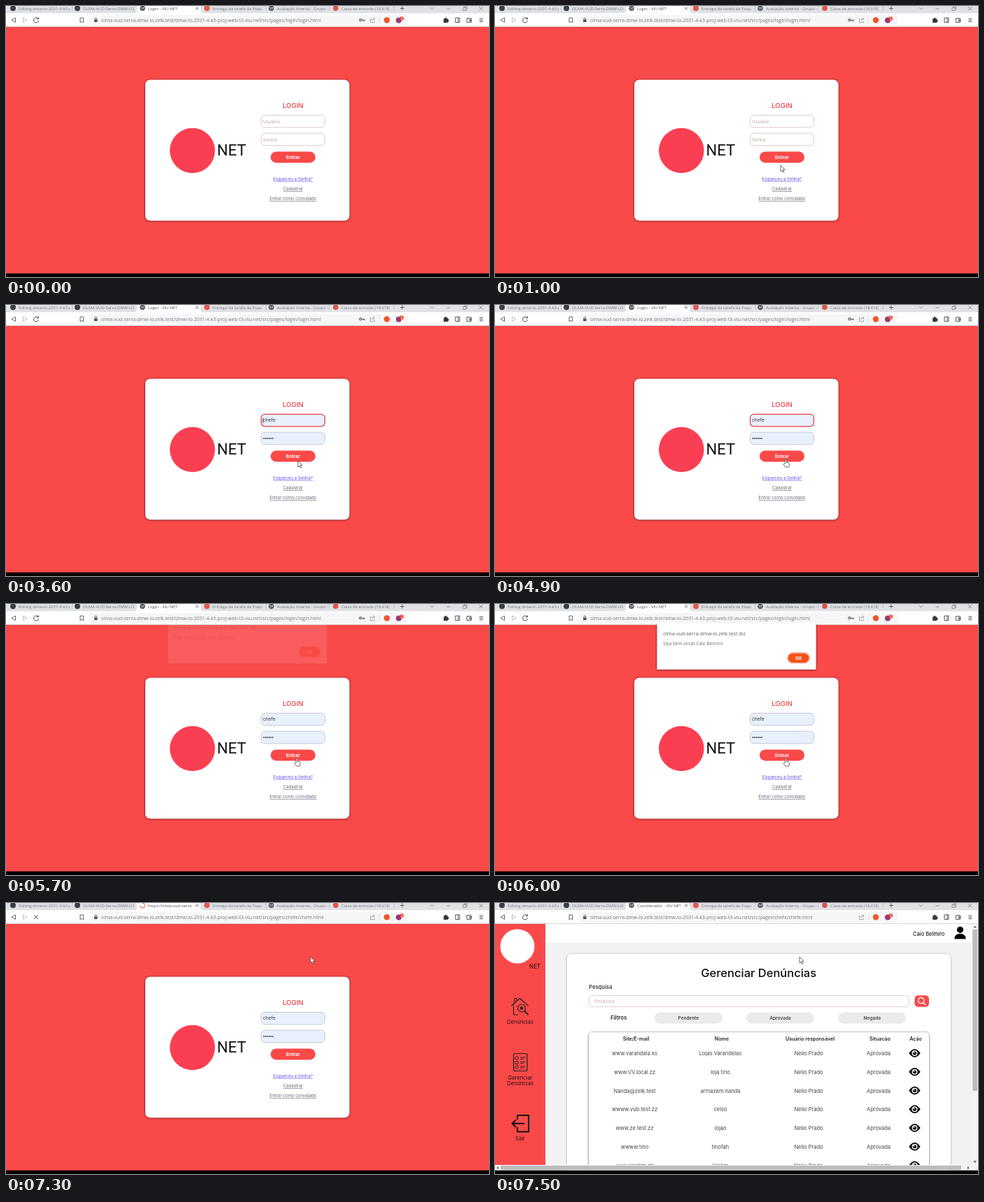
Recreate the animation shown at these times as an HTML page. Size 690x388 px, loop 8 s.

```html
<!DOCTYPE html>
<html lang="pt-BR">
<head>
<meta charset="utf-8">
<title>Login</title>
<style>
html, body { margin: 0; width: 100%; height: 100%; overflow: hidden; background: #000; }
#stage { display: block; width: 100vw; height: 100vh; font-family: Inter, sans-serif; }
.ui { font-family: "Open Sans", sans-serif; }
.mark { font-family: Roboto, sans-serif; }
</style>
</head>
<body>
<svg id="stage" viewBox="0 0 690 388" xmlns="http://www.w3.org/2000/svg"></svg>
<script>
const LOOP = 8000, STEP = 100;
const TOP = 29.8, BOTTOM = 382.9;
const RED = '#fa4949', INK = '#222';
const HOST = 'olma-vud-serra-dmw-lo.zelk.test';
const PATH = HOST + '/dmw-lo-2031-4-k3-proj-web-t3-viu-net/src/pages/';
const PERSON = 'Caio Belmiro';

// Drawing helpers
const attrs = o => Object.entries(o).map(([k, v]) => ` ${k}="${v}"`).join('');
const el = (tag, o, body = '') => `<${tag}${attrs(o)}>${body}</${tag}>`;
const rect = (x, y, width, height, fill, rx = 0, o = {}) => el('rect', { x, y, width, height, fill, rx, ...o });
const circle = (cx, cy, r, fill, o = {}) => el('circle', { cx, cy, r, fill, ...o });
const text = (x, y, str, size, fill = INK, o = {}) => el('text', { x, y, 'font-size': size, fill, ...o }, str);
const mid = (x, y, str, size, fill, weight = 400, o = {}) =>
  text(x, y, str, size, fill, { 'text-anchor': 'middle', 'font-weight': weight, ...o });
const line = (d, stroke = '#555', w = 0.9, fill = 'none', o = {}) =>
  el('path', { d, stroke, 'stroke-width': w, fill, 'stroke-linejoin': 'round', ...o });
const group = (id, body, o = {}) => el('g', { id, ...o }, body);

const globe = x => circle(x, 3.3, 3.8, '#565b63') +
  line(`M${x - 2.5} 2l2 1.2l-.4 1.8M${x + 2.6} 1.8l-1.6.6l.8 2`, '#dfe2e6', 0.8);

function tab(x, title, icon, end, id = '') {
  return icon + `<svg x="${x}" y="0" width="${end - x}" height="10">` +
    text(0, 5.5, title, 5.9, id ? '#4c5056' : '#74787e', id ? { id } : {}) + '</svg>';
}

function browser() {
  const sep = x => rect(x, 0, 0.7, 7, '#b4b7bc');
  const tabs =
    tab(18, 'Editing dmw-lo-2031-4-k3-proj', circle(10, 3.3, 4, '#3a3f45'), 91) + sep(94) +
    tab(110, 'OLMA-VUD-Serra-DMW-LO/dmw', circle(102, 3.3, 4, '#3a3f45'), 184) +
    line('M183 10.5Q187 10 187 6V0H278V6Q278 10 282 10.5Z', 'none', 0, '#fff') +
    group('globe', globe(195)) +
    group('spin', line('M195 0A3.6 3.6 0 1 1 191.4 3.6', '#e8564e', 1)) +
    tab(203, '', '', 265, 'title') +
    line('M271 1.5l4 4M275 1.5l-4 4', '#555', 0.8) +
    tab(295, 'Entrega da tarefa da Etapa 5', circle(287, 3.3, 4, '#e0594f'), 366) + sep(371) +
    tab(387, 'Avaliação Interna - Grupo - 3', globe(379), 460) + sep(461.5) +
    tab(479, 'Caixa de entrada (18.618) - ca', circle(471, 3.3, 3.8, '#dc5448'), 548) + sep(554) +
    line('M563 3.5h6M566 .5v6', '#555', 0.9) +
    line('M606 2.2l2.5 2.5l2.5-2.5M629.5 4h5M676 1.2l5 5M681 1.2l-5 5', '#777', 0.8) +
    line('M653 2.5h4v4h-4zM654.5 2.3V1h4v4h-1.4', '#777', 0.7);
  const tools =
    line('M13.5 17L8 20.2L13.5 23.4Z') +
    line('M24.5 17L30 20.2L24.5 23.4Z', '#b4b6ba') +
    group('reload', line('M45.8 18.2A3.5 3.5 0 1 0 46.5 21M46.4 16.3V18.7H44', '#444', 1)) +
    group('stop', line('M40 17.2l6 6M46 17.2l-6 6', '#444', 1)) +
    line('M106 17h4.6v6.8l-2.3-1.8l-2.3 1.8z') +
    rect(126, 19.3, 4.6, 3.8, '#555', 0.5) + line('M127 19.4v-1.2a1.3 1.3 0 0 1 2.6 0v1.2', '#555', 0.8) +
    text(136, 22.5, '', 6.9, '#74787e', { id: 'url' }) +
    group('key', circle(506.4, 20.2, 1.6, 'none', { stroke: '#555', 'stroke-width': 1.1 }) +
      line('M508 20.2h4v1.8M510.3 20.2v1.4', '#555', 1.1)) +
    line('M522.5 18.5h-2v5h6v-2M522.8 21.3q.4-3 3.2-3M524.6 16.6l2.4 1.8l-2.4 1.8', '#8a8a8a', 0.7) +
    rect(533, 15.5, 0.6, 9, '#d5d7da') +
    circle(544, 20.2, 4.2, '#f1562b') +
    circle(561, 20.5, 4, '#963a76') + rect(562.5, 15.3, 5.5, 5.5, '#e8412c', 2) +
    mid(565.2, 19.8, '2', 4.5, '#fff', 600) +
    line('M625.5 18.5h1.6a1.1 1.1 0 1 1 2 0h1.8v1.8a1.1 1.1 0 1 1 0 2v1.5h-5.4z', '#333', 0.5, '#333') +
    line('M642 17h6v6.4h-6zM646 17v6.4', '#444', 0.9) +
    line('M658.4 17.6h6v5.8h-6zM662 19.6h3v2h-3z', '#444', 0.9) +
    line('M676.4 18h5M676.4 20.3h5M676.4 22.6h5', '#444', 0.9);
  return el('g', { class: 'ui' }, rect(0, 0, 690, 11, '#dfe1e5') + rect(0, 10.3, 690, TOP - 10.3, '#fff') +
    rect(120, 13, 455, 14.5, '#f6f6f8', 3) + tabs + tools);
}

function loginPage() {
  const field = (y, label, id) =>
    rect(364.5, y, 91, 17.6, '#fff', 5.5, { id, 'stroke-width': 0.9 }) +
    text(367, y + 11.3, label, 6.6, '#c9b3b1', { class: 'hint', 'font-weight': 500 });
  const link = (y, str, color) => mid(410, y, str, 6.1, color, 400, { 'text-decoration': 'underline' });
  let dots = '';
  for (let i = 0; i < 6; i++) dots += circle(368.4 + i * 2.5, 191, 0.9, '#333');
  return rect(0, TOP, 690, BOTTOM - TOP, RED) +
    rect(199, 105.8, 291.5, 201.5, '#fff', 7, { filter: 'url(#deep)' }) +
    circle(266.3, 207, 32.3, '#fb3f53') +
    text(301.5, 214.4, 'NET', 22, '#111', { class: 'mark' }) +
    mid(410, 146, 'LOGIN', 9.6, '#ee4146', 500) +
    field(156.3, 'Usuário', 'user') + field(182.2, 'Senha', 'pass') +
    group('typed', text(367, 167.4, 'chefe', 6.7, '#333') + dots) +
    rect(366.8, 161.5, 0.7, 7.5, '#111', 0, { id: 'caret' }) +
    rect(378, 208.4, 64, 16, RED, 8) + mid(410, 218.8, 'Entrar', 6.7, '#fff', 700) +
    link(249.8, 'Esqueceu a Senha?', '#5a50e6') +
    link(264, 'Cadastrar', '#6a6478') + link(278, 'Entrar como convidado', '#6a6478');
}

function sidebar() {
  const label = (y, str) => mid(36, y, str, 7.6, '#2a1414');
  const house = line('M23.5 147L35.5 136.5L47.5 147M26.5 145V160H33M31 140V136.5H28V143', INK, 1.1) +
    circle(38, 150.5, 5.5, 'none', { stroke: INK, 'stroke-width': 1.2 }) +
    circle(38, 150.5, 2.2, INK) + line('M42 154.5L47.5 160', INK, 1.8);
  let list = rect(26.5, 215.5, 19.5, 25, 'none', 2, { stroke: INK, 'stroke-width': 1.2 });
  for (let i = 0; i < 3; i++) {
    const y = 220 + i * 6.5;
    list += rect(29, y, 4, 4, 'none', 0.6, { stroke: INK, 'stroke-width': 0.9 }) +
      line(`M36 ${y + 1}h7.5M36 ${y + 3.2}h5`, INK, 0.9);
  }
  const exit = line('M32 310V304H48V327.5H32V321M42 315.7H25M30 310.5L24.5 315.7L30 321', '#160c0c', 2);
  return rect(0, TOP, 72, 375 - TOP, RED) + circle(32, 62, 24.5, '#fff') +
    text(49, 94, 'NET', 8.6, '#2a1414', { class: 'mark' }) +
    house + label(173, 'Denúncias') + list + label(252.7, 'Gerenciar') + label(261, 'Denúncias') +
    exit + label(340, 'Sair');
}

function table() {
  const cols = [199.5, 322, 448, 548];
  const rows = [
    ['www.varandela.ks', 'Lojas Varandelas'], ['www.VV.local.zz', 'loja tino'],
    ['Nanda@zelk.test', 'armazem nanda'], ['wwww.vub.test.zz', 'celso'],
    ['www.ze.test.zz', 'lojao'], ['wwww.tino', 'tinofah'], ['www.lolatim.zz', 'lolatim']
  ];
  const heads = [[201.5, 'Site/E-mail'], [324, 'Nome'], [450, 'Usuário responsável'], [550, 'Situacão'], [601, 'Ação']];
  const eye = y => line(`M591.3 ${y}Q599.5 ${y - 11.5} 607.7 ${y}Q599.5 ${y + 11.5} 591.3 ${y}Z`, 'none', 0, '#000') +
    circle(599.5, y, 4, '#fff') + circle(599.5, y, 2.6, '#000') + circle(598.5, y - 1, 0.9, '#fff');
  return rect(134, 185.3, 486, 220, '#fff', 5, { filter: 'url(#deep)' }) +
    heads.map(([x, s]) => mid(x, 196.8, s, 7.1, INK, 600)).join('') +
    rows.map((r, i) => {
      const y = 215 + i * 26.75;
      return [...r, 'Nelio Prado', 'Aprovada'].map((s, c) => mid(cols[c], y + 3.2, s, 7.5, '#444')).join('') + eye(y);
    }).join('');
}

function panelPage() {
  const pill = (x, str) => rect(x, 156.5, 97, 16.3, '#ebebeb', 8) + mid(x + 48.5, 167, str, 6.5, '#444', 600);
  const main = rect(72, 57, 609, 318, '#f2f2f3') + rect(72, TOP, 609, 57 - TOP, '#fff') +
    text(597, 46.5, PERSON, 7.5, INK, { 'font-weight': 500 }) +
    circle(664.5, 38.3, 4.6, '#000') + line('M656.3 51.5Q656.3 44 664.5 44Q672.7 44 672.7 51.5Z', 'none', 0, '#000') +
    rect(103, 73, 548, 340, '#fff', 6, { filter: 'url(#soft)' }) +
    mid(376.7, 106, 'Gerenciar Denúncias', 16.5, '#111', 500) +
    text(134, 122.7, 'Pesquisa', 7.7, INK, { 'font-weight': 500 }) +
    rect(134.4, 132.6, 457, 16, '#fff', 4, { stroke: '#dfbdbb', 'stroke-width': 0.8 }) +
    text(142, 143, 'Pesquisa', 6.6, '#cfa9a4') +
    rect(599.5, 132.3, 20.5, 16.5, RED, 5) +
    circle(608.7, 139.6, 4.1, 'none', { stroke: '#fff', 'stroke-width': 1.3 }) + line('M611.7 142.6L615.3 146', '#fff', 1.5) +
    text(165, 167.3, 'Filtros', 7.7, INK, { 'font-weight': 600 }) +
    pill(228, 'Pendente') + pill(359, 'Aprovada') + pill(490.3, 'Negada') + table();
  const bars = rect(681, TOP, 9, BOTTOM - TOP, '#f3f3f3') + rect(0, 375, 690, BOTTOM - 375, '#f3f3f3') +
    rect(682.3, 38, 6.8, 231, '#bdbdbd') + rect(8, 376, 658, 6.2, '#bdbdbd') +
    line('M683.5 35.3l2.2-2.6l2.2 2.6zM683.5 369.3l2.2 2.6l2.2-2.6zM4.9 377l-2.5 2.2l2.5 2.2zM675 377l2.5 2.2l-2.5 2.2z', 'none', 0, '#555');
  return main + sidebar() + bars;
}

function dialog() {
  return rect(231.5, 27.5, 227, 66.3, '#fff', 1.5, { filter: 'url(#deep)' }) +
    text(240, 44.6, HOST + ' diz', 7.1, '#5c5f64') +
    text(240, 58.8, 'Seja bem-vindo ' + PERSON, 6.4, '#6c6f74') +
    rect(417.7, 69.6, 31.8, 15.2, '#fff', 7.6, { stroke: '#f0a48c', 'stroke-width': 1 }) +
    rect(418.6, 70.5, 30, 13.4, '#f6511d', 6.7) + mid(433.6, 79.5, 'OK', 6.2, '#fff', 700);
}

const pointer = group('arrow', line('M0 0V8.8L2 7L3.4 10.2L4.9 9.5L3.5 6.4H6.1Z', '#444', 0.8, '#fff')) +
  group('hand', line('M-1 6V.8Q-.8-.2 0-.2Q.8-.2 1 .8V4.2L4 4.8Q5 5.2 5 6.2L4.2 10.8H-.6L-3.4 7.2Q-3.4 5.8-2.2 5.9Z', '#444', 0.8, '#fff'));

const shadow = (id, blur, alpha) =>
  `<filter id="${id}" x="-10%" y="-20%" width="120%" height="150%"><feDropShadow dx="0" dy=".4" stdDeviation="${blur}" flood-color="#000" flood-opacity="${alpha}"/></filter>`;

document.getElementById('stage').innerHTML =
  '<defs>' + shadow('deep', 1.8, 0.75) + shadow('soft', 1.6, 0.35) +
  '<clipPath id="below"><rect x="220" y="28" width="250" height="80"/></clipPath></defs>' +
  rect(0, 0, 690, 388, '#000') +
  group('login', loginPage()) + group('panel', panelPage()) +
  rect(0, BOTTOM, 690, 388 - BOTTOM, '#000') + browser() +
  el('g', { 'clip-path': 'url(#below)' }, group('dialog', dialog(), { class: 'ui' })) +
  group('mouse', pointer);

// Motion
const $ = id => document.getElementById(id);
const show = (node, on) => node.setAttribute('visibility', on ? 'visible' : 'hidden');
const clamp = v => Math.max(0, Math.min(1, v));
const hints = document.querySelectorAll('.hint');
const track = [
  [300, 545, 18], [1000, 408, 228], [1700, 408, 228], [2200, 399.5, 171], [2300, 399, 165],
  [2500, 401, 214], [2600, 402, 221], [2800, 402, 222], [3200, 412, 241], [3400, 414, 239],
  [3600, 417, 223], [4100, 415.5, 221.3], [6000, 415.5, 221.3], [6300, 430, 122], [6600, 435, 77]
];

function mouseAt(t) {
  const i = track.findIndex(k => k[0] > t);
  if (i < 0) return track[track.length - 1].slice(1);
  if (i === 0) return track[0].slice(1);
  const [a, b] = [track[i - 1], track[i]];
  let p = (t - a[0]) / (b[0] - a[0]);
  p = p * p * (3 - 2 * p);
  return [a[1] + (b[1] - a[1]) * p, a[2] + (b[2] - a[2]) * p];
}

function draw(t) {
  const filled = t >= 2800, focus = t >= 2400 && t < 5500;
  const leaving = t >= 6900, done = t >= 7400;

  show($('login'), !done);
  show($('panel'), done);
  show($('typed'), filled && !done);
  show($('caret'), t >= 3400 && t < 3900);
  hints.forEach(h => show(h, !filled && !done));
  for (const id of ['user', 'pass']) {
    const active = focus && id === 'user';
    $(id).setAttribute('fill', filled ? '#e8f0fe' : '#fff');
    $(id).setAttribute('stroke', active ? '#e8404a' : filled ? '#c4c4cc' : '#d9c3c1');
    $(id).setAttribute('stroke-width', active ? 1.3 : 0.9);
  }

  const loading = leaving && !done;
  show($('reload'), !loading);
  show($('stop'), loading);
  show($('globe'), !loading);
  show($('spin'), loading);
  show($('key'), t < 7200);
  $('spin').setAttribute('transform', `rotate(${(t - 7300) * 0.36} 195 3.6)`);
  $('title').textContent = done ? 'Coordenador - VIU NET' : leaving ? 'https://' + HOST : 'Login - VIU NET';
  $('url').textContent = PATH + (leaving ? 'chefe/chefe.html' : 'login/login.html');

  const rise = clamp((t - 5600) / 300), fall = clamp((6900 - t) / 200);
  $('dialog').setAttribute('opacity', rise * rise * fall);
  $('dialog').setAttribute('transform', `translate(0 ${-13 * (1 - rise)})`);

  const [x, y] = mouseAt(t), hand = t >= 4100 && t <= 6000;
  $('mouse').setAttribute('transform', `translate(${x} ${y})`);
  show($('arrow'), t >= 300 && !hand);
  show($('hand'), hand);
}

const start = performance.now();
function tick() {
  const t = (performance.now() - start) % LOOP;
  draw(Math.floor(t / STEP) * STEP);
  requestAnimationFrame(tick);
}
tick();
</script>
</body>
</html>
```
